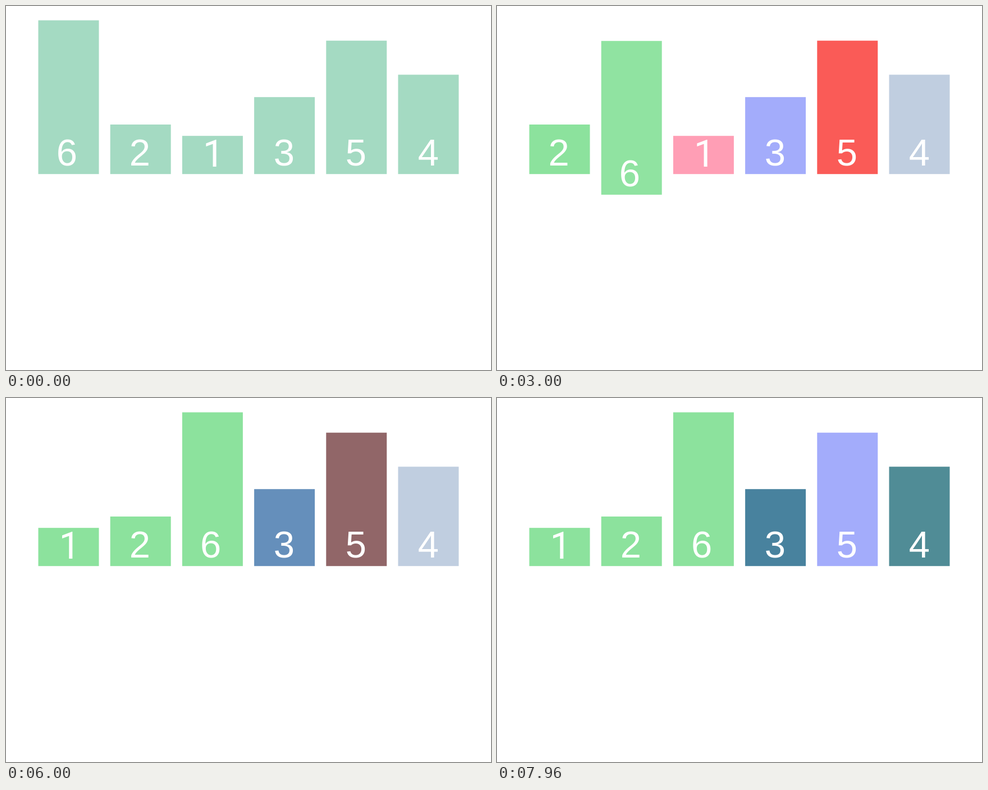
These frames come from a looping animation (864 by 648 pixels, 8 s). An HTML page:

```html
<!DOCTYPE html>
<html lang="en">
<head>
<meta charset="utf-8">
<title>Merge sort</title>
<style>
  html, body { margin: 0; width: 100%; height: 100%; overflow: hidden; background: #fff; }
  svg { display: block; width: 100vw; height: 100vh; }
  text { fill: #fff; font: 67px "Liberation Sans", Arial, sans-serif; text-anchor: middle; }
  .one { font-family: Roboto, sans-serif; }
</style>
</head>
<body>
<svg id="stage" viewBox="0 0 864 648"></svg>
<script>
const LOOP = 8000, FRAME = 40, STEP = 384.6, FIRST_MOVE = 1578;
const BAR_WIDTH = 108, SLOT_LEFT = 57.5, SLOT_GAP = 128.2, FLOOR = 299.2, DROP = 314.2;
const START = '#a4dac2', GREEN = '#8ce29d', PALE = '#a9e8b7', TEAL = '#25727a', BLUE = '#a3acfb';

// value, height, own colour, digit offset
const bars = [
  [6, 273.7, '#aeeabb', -3.2],
  [2, 88.2, '#ffd59b', -1.3],
  [1, 68, '#ff9eb5', 1.8],
  [3, 137, BLUE, -0.8],
  [5, 237.5, '#fa5b57', -0.9],
  [4, 176.9, '#c0cee0', 0]
];

const down = (bar, slot, color) => [{ bar, slot, low: 1, color }];
const rise = (bar, color) => [{ bar, low: 0, color }];
const paint = (color, ...list) => list.map(bar => ({ bar, color }));

const steps = [
  down(2, 0), down(6, 1), rise(2, GREEN), rise(6, GREEN),
  [...paint(GREEN, 2, 1), ...paint(PALE, 6)],
  down(1, 0), down(2, 1), down(6, 2, GREEN),
  rise(1, GREEN), rise(2, GREEN), rise(6, GREEN),
  paint(TEAL, 3, 5),
  down(3, 3), down(5, 4), rise(3, BLUE), rise(5, BLUE),
  paint(TEAL, 3, 4)
];

const rgb = hex => [1, 3, 5].map(i => parseInt(hex.slice(i, i + 2), 16));
const mix = (a, b, p) => a + (b - a) * p;

function smooth(t) {
  t = Math.min(1, Math.max(0, t));
  const sigmoid = x => 1 / (1 + Math.exp(-x));
  const edge = sigmoid(-5);
  return Math.min(1, Math.max(0, (sigmoid(10 * (t - 0.5)) - edge) / (1 - 2 * edge)));
}

function add(parent, tag, attrs) {
  const node = document.createElementNS('http://www.w3.org/2000/svg', tag);
  for (const name in attrs) node.setAttribute(name, attrs[name]);
  return parent.appendChild(node);
}

const stage = document.getElementById('stage');
const nodes = bars.map(([value, height, , shift]) => {
  const group = add(stage, 'g', {});
  const rect = add(group, 'rect', { y: -height, width: BAR_WIDTH, height });
  const digit = add(group, 'text', { x: BAR_WIDTH / 2 + shift, y: value === 1 ? -13.3 : -15.2 });
  digit.textContent = value;
  if (value === 1) digit.classList.add('one');
  return { group, rect };
});

function poseAt(time) {
  const fade = smooth((time - 920) / 658);
  const pose = {};
  bars.forEach(([value, , own], slot) => {
    const target = rgb(own);
    pose[value] = { slot, low: 0, color: rgb(START).map((c, i) => mix(c, target[i], fade)) };
  });
  steps.forEach((actions, k) => {
    const p = smooth((time - FIRST_MOVE) / STEP - k);
    if (!p) return;
    for (const { bar, slot, low, color } of actions) {
      const state = pose[bar];
      if (slot !== undefined) state.slot = mix(state.slot, slot, p);
      if (low !== undefined) state.low = mix(state.low, low, p);
      if (color) {
        const target = rgb(color);
        state.color = state.color.map((c, i) => mix(c, target[i], p));
      }
    }
  });
  return pose;
}

function draw(elapsed) {
  const time = Math.floor((elapsed % LOOP) / FRAME) * FRAME;
  const pose = poseAt(time);
  bars.forEach(([value], i) => {
    const { slot, low, color } = pose[value];
    const x = SLOT_LEFT + slot * SLOT_GAP, y = FLOOR + low * DROP;
    nodes[i].group.setAttribute('transform', `translate(${x} ${y})`);
    nodes[i].rect.setAttribute('fill', `rgb(${color.map(Math.round)})`);
  });
}

const began = performance.now();
function tick(now) {
  draw(Math.max(0, now - began));
  requestAnimationFrame(tick);
}
draw(0);
requestAnimationFrame(tick);
</script>
</body>
</html>
```
